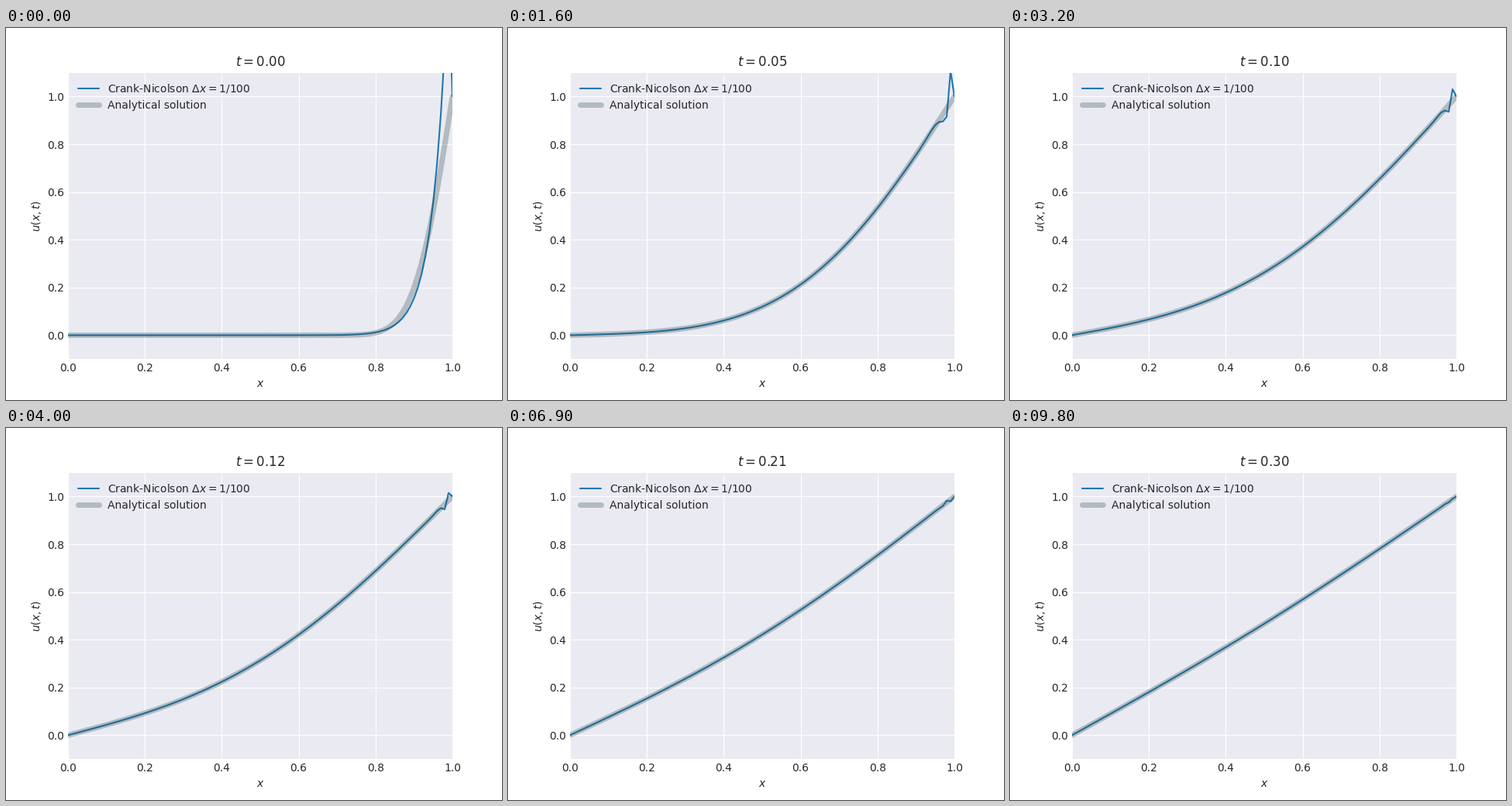
These frames come from a looping animation (640 px wide and 480 px high, 9.9 s). A matplotlib script:

```python
import matplotlib.pyplot as plt
import numpy as np
from matplotlib.animation import FuncAnimation

plt.style.use("seaborn-v0_8-darkgrid")
plt.rcParams["font.family"] = "DejaVu Sans"

CELLS = 100
T_END = 0.3
times = np.linspace(0, T_END, 100)
x = np.linspace(0, 1, CELLS + 1)


def crank_nicolson():
    """Heat equation with u(0)=0, u(1)=1, starting from zero inside."""
    r = (times[1] - times[0]) * CELLS**2
    lap = np.zeros((CELLS + 1, CELLS + 1))
    for i in range(1, CELLS):
        lap[i, i - 1:i + 2] = 1, -2, 1
    eye = np.eye(CELLS + 1)
    step = np.linalg.solve(eye - r / 2 * lap, eye + r / 2 * lap)
    u = np.zeros(CELLS + 1)
    u[-1] = 1
    states = [u]
    for _ in times[1:]:
        states.append(step @ states[-1])
    return states


def analytical(t, terms=100):
    n = np.arange(1, terms + 1)
    weights = 2 * (-1.0)**n / (n * np.pi) * np.exp(-(n * np.pi)**2 * t)
    return x + np.sin(np.pi * np.outer(x, n)) @ weights


states = crank_nicolson()

fig, ax = plt.subplots(figsize=(6.4, 4.8), dpi=100)
numeric, = ax.plot([], [], color="#1f77b4", lw=1.5,
                   label=r"Crank-Nicolson $\Delta x = 1/100$")
exact, = ax.plot([], [], color="darkslategray", lw=5, alpha=0.3,
                 label="Analytical solution")
ax.set(xlim=(0, 1), ylim=(-0.1, 1.1), xlabel="$x$", ylabel="$u(x,t)$")
title = ax.set_title("$t=0.00$")
ax.legend(loc="upper left")


def draw(frame):
    k = frame + 1
    numeric.set_data(x, states[k])
    exact.set_data(x, analytical(times[k]))
    title.set_text(f"$t={times[k]:.2f}$")
    return numeric, exact, title


anim = FuncAnimation(fig, draw, frames=len(times) - 1, interval=100,
                     repeat=True, repeat_delay=0, blit=False)
plt.show()
```
